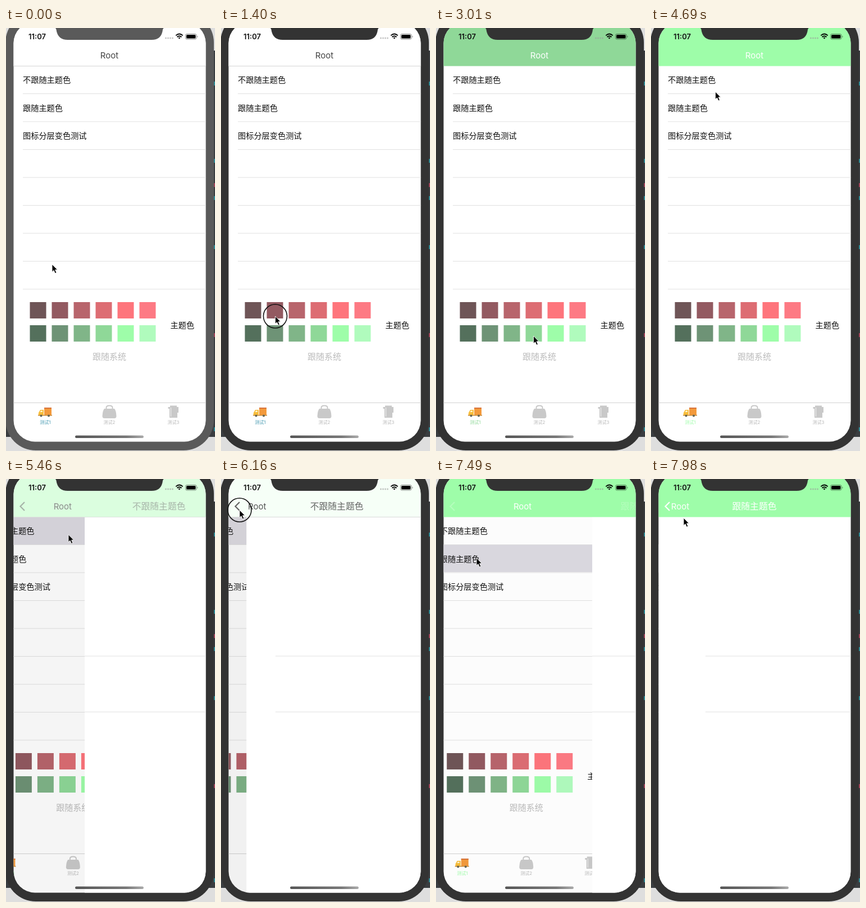
Write an HTML page that moves like this. It is 372 by 750 pixels and loops after 8 s.

```html
<!DOCTYPE html>
<html lang="zh-CN">
<head>
<meta charset="utf-8">
<title>Theme colours</title>
<style>
html, body { margin: 0; width: 100%; height: 100%; overflow: hidden; background: #ddd; }
svg { display: block; width: 372px; height: 750px; }
text { font-family: Inter, "Noto Sans CJK SC", "Noto Sans CJK", sans-serif; font-size: 14.2px; fill: #111; }
.mid { text-anchor: middle; }
.nav { font-size: 15.8px; }
.tab { font-size: 8px; text-anchor: middle; fill: #b9b9b9; }
.line { stroke: #e1e1e1; }
</style>
</head>
<body>
<svg viewBox="0 0 372 750">
  <defs>
    <clipPath id="screen"><rect x="13.5" y="-11" width="342" height="744.5" rx="38"/></clipPath>
    <linearGradient id="homeFill"><stop stop-color="#555"/><stop offset=".75" stop-color="#777"/><stop offset="1" stop-color="#aaa"/></linearGradient>
  </defs>
  <rect width="372" height="750" fill="#dedede"/>
  <rect y="40" width="372" height="685" fill="#3a3d40"/>
  <g id="ticks"></g>
  <rect class="bezel" x="-1" y="-28" width="371" height="777" rx="54"/>

  <g clip-path="url(#screen)">
    <rect width="372" height="750" fill="#fff"/>
    <g id="root">
      <rect id="highlight" x="13" y="68" width="343" height="48" fill="#dcdae1"/>
      <g id="list"></g>
      <text x="292.5" y="532">主题色</text>
      <text class="mid" x="184" y="588" style="font-size:15px;fill:#bcbcbc">跟随系统</text>
      <path d="M13 664.5H356" stroke="#d2d2d2"/>
      <g id="truck">
        <path d="M68 673H81V686H68Z" fill="#f39a3c"/>
        <path d="M68 673H81V675H68Z" fill="#d9743a"/>
        <path d="M58 682L61 677H67V687H57.5Z" fill="#f7bd3b"/>
        <path d="M60.5 681L62 678.5H65V681Z" fill="#fff3d0"/>
        <path d="M57 686H82V687.5H57Z" fill="#c98a35"/>
        <circle cx="62.5" cy="687.5" r="2" fill="#665"/>
        <circle cx="76" cy="687.5" r="2" fill="#665"/>
      </g>
      <g fill="#c9c9c9">
        <path d="M175 675H193Q196 678 196.500 688Q196.500 692 193 692H175Q171.500 692 171.500 688Q172 678 175 675Z"/>
        <path d="M178.500 676V673Q178.500 669.500 184 669.500T189.500 673V676" fill="none" stroke="#c9c9c9" stroke-width="2"/>
        <path d="M292 669.500H304V672H307V682H305V691H291V675H288.500V672H292Z"/>
        <path d="M293.500 673V689" stroke="#f2f2f2"/>
      </g>
      <text id="activeTab" class="tab" x="70" y="702">测试1</text>
      <text class="tab" x="184" y="702">测试2</text>
      <text class="tab" x="298" y="702">测试3</text>
    </g>
    <rect id="dim" width="372" height="750"/>
    <g id="detail"><rect x="13.5" y="67" width="342" height="683" fill="#fff"/></g>
    <path id="detailLines" class="line"/>
    <rect id="bar" width="372" height="67.500"/>
    <path id="barLine" d="M13 67.500H356" stroke="#d5d5d5"/>
    <path id="chevron" d="M33 41L25.500 48.500L33 56" fill="none" stroke-width="2.200"/>
    <text id="rootTitle" class="mid nav" x="184" y="54" style="font-size:15px">Root</text>
    <text id="detailTitle" class="mid nav" x="184" y="54"></text>
    <text x="40" y="20" style="font-size:13px;font-weight:600">11:07</text>
    <g id="dots" fill="#999" fill-opacity=".6"></g>
    <g fill="none" stroke="#000" stroke-width="1.800">
      <path d="M302.300 13.300Q308.500 7.700 314.700 13.300M304.500 16Q308.500 12.500 312.500 16"/>
      <path d="M306.500 17.300Q308.500 15.500 310.500 17.300L308.500 19.500Z" fill="#000" stroke="none"/>
    </g>
    <rect x="319.500" y="10.500" width="19.500" height="9.500" rx="2.700" fill="none" stroke="#000" stroke-opacity=".45"/>
    <rect x="321" y="12" width="16.500" height="6.500" rx="1.500"/>
    <path d="M340.500 13.500Q342.500 15.250 340.500 17Z" fill-opacity=".5"/>
    <rect x="123" y="722.500" width="122" height="4.500" rx="2.200" fill="url(#homeFill)"/>
  </g>

  <path class="bezel" d="M84 -1Q89 -1 89.500 3Q92 21 110 21H259Q277 21 279 3Q280 -1 284 -1Z"/>
  <circle id="ring" r="21" fill="none" stroke="#111" stroke-width="1.600"/>
  <path id="cursor" d="M0 0V13.500L3.100 10.700L5.400 16L7.900 14.900L5.600 9.800H9.700Z" stroke="#fff" stroke-width=".9"/>
</svg>
<script>
const LOOP = 8000;
const REDS = ['#6f5557', '#935a61', '#b8656c', '#dd6d73', '#fe757c', '#fd7a84'];
const GREENS = ['#54705c', '#6e9376', '#80b588', '#8fd898', '#9efda9', '#b0fbbd'];
const ROWS = ['不跟随主题色', '跟随主题色', '图标分层变色测试'];
const $ = id => document.getElementById(id);

function add(parent, tag, attrs, text = '') {
  const node = document.createElementNS(parent.namespaceURI, tag);
  set(node, attrs);
  node.textContent = text;
  parent.append(node);
}
function set(node, attrs) {
  for (const key in attrs) node.setAttribute(key, attrs[key]);
}

for (let i = 0; i < 8; i++) {
  const y = 116.5 + 49.5 * i;
  add($('list'), 'path', { d: `M30 ${y}H356`, class: 'line' });
  if (ROWS[i]) add($('list'), 'text', { x: 30, y: y - 19.5 }, ROWS[i]);
}
[REDS, GREENS].forEach((colours, row) => colours.forEach((fill, i) =>
  add($('list'), 'rect', { x: 42.5 + 39 * i, y: 486 + 41 * row, width: 29, height: 29, fill })));
for (let i = 0; i < 4; i++) add($('dots'), 'circle', { cx: 284.5 + 4 * i, cy: 18, r: 1.4 });
[95, 232, 275, 298, 385, 541, 708].forEach((y, i) =>
  add($('ticks'), 'rect', { x: 370, y, width: 2, height: 7, fill: i % 3 == 2 ? '#a3455a' : '#2f8c96' }));

// time, x, y of the pointer tip
const POINTER = [
  [0, 82, 419], [600, 82, 419], [1200, 96.5, 511], [1650, 96.5, 511],
  [2000, 174, 506], [2350, 174, 506], [2650, 173.5, 546], [3150, 173.5, 546],
  [3500, 213, 547], [3950, 213, 547], [4600, 114.5, 113], [4800, 114.5, 113],
  [5000, 111, 98.5], [5500, 111, 98.5], [5950, 33, 55], [6550, 33, 55],
  [7100, 72, 140], [7500, 72, 140], [7950, 58, 69]
];
const CLICKS = [490, 1330, 2130, 2800, 3600, 5130, 6020, 7300];
const THEMES = [[1470, REDS[1]], [2270, REDS[3]], [2940, GREENS[3]], [3740, GREENS[4]]];

const clamp = v => Math.max(0, Math.min(1, v));
const slide = (t, start) => 1 - (1 - clamp((t - start) / 500)) ** 3;
const rgb = hex => [1, 3, 5].map(i => parseInt(hex.substr(i, 2), 16));
function mix(a, b, p) {
  const to = rgb(b);
  return `rgb(${rgb(a).map((v, i) => Math.round(v + (to[i] - v) * p))})`;
}
function pointerAt(t) {
  const next = POINTER.findIndex(k => k[0] > t);
  if (next < 0) return POINTER.at(-1).slice(1);
  const [t0, x0, y0] = POINTER[next - 1], [t1, x1, y1] = POINTER[next];
  const u = (t - t0) / (t1 - t0), p = u * u * (3 - 2 * u);
  return [x0 + (x1 - x0) * p, y0 + (y1 - y0) * p];
}

function render(t) {
  const theme = THEMES.filter(([start]) => t >= start).at(-1)?.[1];
  const themedPage = t >= 7000;
  const popping = t >= 6145 && !themedPage;
  const p = themedPage ? slide(t, 7450) : popping ? 1 - slide(t, 6145) : slide(t, 5320);
  const plain = themedPage ? 0 : p;
  const ink = theme ? mix('#ffffff', '#444444', plain) : '#444';

  document.querySelectorAll('.bezel').forEach(node => set(node, { fill: t < 490 ? '#5a5a5a' : '#333' }));
  set($('bar'), { fill: mix(theme || '#ffffff', '#ffffff', plain) });
  set($('barLine'), { opacity: theme ? plain : 1 });
  $('activeTab').style.fill = theme || '#489bb2';

  set($('root'), { transform: `translate(${-102.6 * p} 0)` });
  set($('dim'), { 'fill-opacity': 0.06 * p });
  set($('detail'), { transform: `translate(${342 * (1 - p)} 0)` });
  const lineX = Math.max(97, 13.5 + 342 * (1 - p));
  set($('detailLines'), { d: `M${lineX} 314H356M${lineX} 413H356`, opacity: p > 0 ? 1 : 0 });

  const touched = t >= 5230 && t < 7000 || t >= 7390;
  set($('highlight'), { y: themedPage ? 117 : 68, opacity: touched ? (popping ? p : 1) : 0 });

  $('rootTitle').style.fill = $('detailTitle').style.fill = ink;
  set($('rootTitle'), { x: 184 - 132 * p + (1 - plain) * 0 });
  set($('detailTitle'), { x: 184 + 238 * (1 - p), opacity: p });
  $('detailTitle').textContent = ROWS[themedPage ? 1 : 0];
  set($('chevron'), { stroke: ink, opacity: p });

  const [x, y] = pointerAt(t);
  set($('cursor'), { transform: `translate(${x} ${y})` });
  const pressed = CLICKS.some(start => t >= start && t < start + 160);
  set($('ring'), { cx: x, cy: y, opacity: pressed ? 1 : 0 });
}

function tick() {
  render(performance.now() % LOOP);
  requestAnimationFrame(tick);
}
tick();
</script>
</body>
</html>
```
